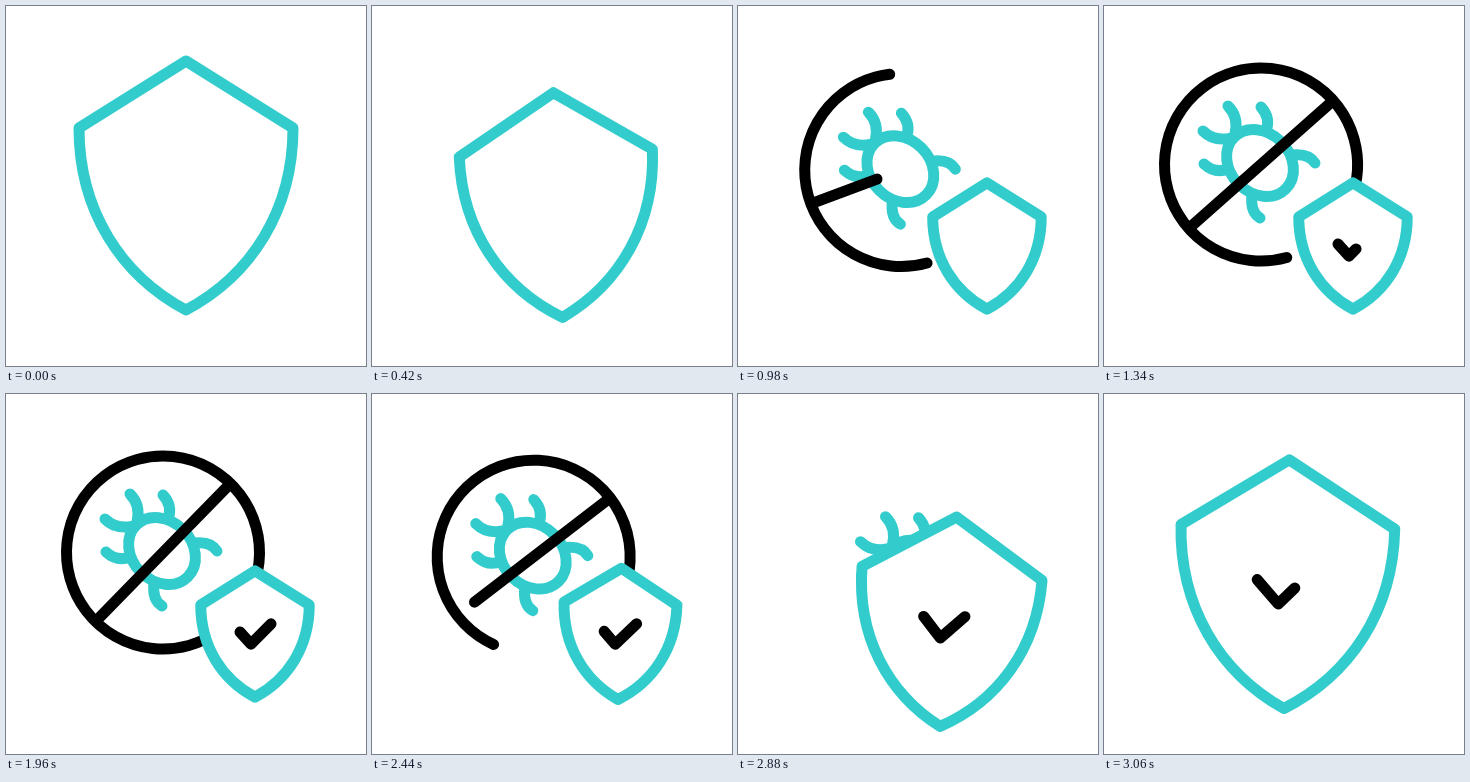
An HTML page with a canvas for the animation above (3080 ms loop, 360 by 360 pixels).

```html
<!DOCTYPE html>
<html lang="en">
<head>
<meta charset="utf-8">
<title>Virus protection</title>
<style>
  html, body { margin: 0; width: 100%; height: 100%; overflow: hidden; background: #fff; }
  canvas { display: block; width: 360px; height: 360px; }
</style>
</head>
<body>
<canvas id="stage"></canvas>
<script>
const LOOP = 3080;
const TEAL = '#33cccc';
const RAD = Math.PI / 180;

const canvas = document.getElementById('stage');
const ctx = canvas.getContext('2d');
const dpr = window.devicePixelRatio || 1;
canvas.width = canvas.height = 360 * dpr;

const mix = (a, b, k) => a + (b - a) * k;
const span = (t, from, to) => Math.min(1, Math.max(0, (t - from) / (to - from)));
const smooth = (t, from, to) => {
  const k = span(t, from, to);
  return k * k * (3 - 2 * k);
};

// Cubic easing with control points (x1, 0) and (x2, 1).
function ease(k, x1, x2) {
  let lo = 0, hi = 1;
  for (let i = 0; i < 30; i++) {
    const u = (lo + hi) / 2, v = 1 - u;
    if (3 * v * v * u * x1 + 3 * v * u * u * x2 + u * u * u < k) lo = u;
    else hi = u;
  }
  return lo * lo * (3 - 2 * lo);
}

// Strokes a path built in local space with a line weight that ignores scale.
function draw(color, place, build, fill) {
  ctx.save();
  ctx.beginPath();
  place();
  build();
  ctx.restore();
  if (fill) {
    ctx.fillStyle = fill;
    ctx.fill();
  }
  ctx.strokeStyle = color;
  ctx.stroke();
}

function shieldPose(t) {
  let along, small, turn;
  if (t < 1500) {
    along = small = ease(span(t, 0, 1000), 0.78, 0.33);
    turn = -4 * Math.sin(Math.PI * along);
  } else {
    const k = span(t, 2180, 3088);
    along = 1 - Math.pow(k, 3.6);
    small = 1 - ease(k, 0.92, 0.65);
    turn = 6.4 * smooth(t, 2300, 2740) - 5.2 * smooth(t, 2740, LOOP);
  }
  const bend = 2 * along * (1 - along), end = along * along;
  return {
    x: 180 + 69 * (0.15 * bend + end),
    y: 179.5 + 60.5 * (0.9 * bend + end),
    scale: 1 - 0.493 * small,
    turn: turn * RAD
  };
}

const shieldShape = () => {
  ctx.moveTo(0, -124.5);
  ctx.lineTo(107, -57.5);
  ctx.bezierCurveTo(107, 25, 65, 90, 0, 124.5);
  ctx.bezierCurveTo(-65, 90, -107, 25, -107, -57.5);
  ctx.closePath();
};

const bodyShape = () => ctx.ellipse(0, 0, 36.5, 30, Math.PI / 4, 0, Math.PI * 2);

const legShape = () => {
  ctx.moveTo(-32, -57);
  ctx.quadraticCurveTo(-21, -46, -25, -29);
  ctx.moveTo(1, -56);
  ctx.quadraticCurveTo(11, -45, 6, -32);
  ctx.moveTo(55, 0);
  ctx.quadraticCurveTo(49, -10, 32, -8);
};

function drawBug(shift) {
  const place = () => ctx.translate(156 + 23.5 * shift, 157 + 22.7 * shift);
  draw(TEAL, place, bodyShape);
  draw(TEAL, place, legShape);
  draw(TEAL, () => { place(); ctx.transform(0, 1, 1, 0, 0, 0); }, legShape);
}

function drawSign(t, shift) {
  const place = () => ctx.translate(157 + 23 * shift, 158.5 + 20.5 * shift);
  const cut = smooth(t, 2275, 3075);

  // On the way out the tail of the ring also draws back behind the shield.
  const ringEnd = smooth(t, 465, 1465) - 0.22 * cut;
  if (ringEnd > cut) {
    const angle = k => (74.5 + 360 * k) * RAD;
    draw('#000', place, () => ctx.arc(0, 0, 96.5, angle(cut), angle(ringEnd)));
  }

  const barEnd = smooth(t, 760, 1300);
  if (barEnd > cut) {
    const lean = t < 1700 ? 1 - smooth(t, 600, 1525) : shift;
    draw('#000', () => { place(); ctx.rotate((-45.7 + 40 * lean) * RAD); }, () => {
      ctx.moveTo(mix(-96, 96, cut), 0);
      ctx.lineTo(mix(-96, 96, barEnd), 0);
    });
  }
}

function drawShield(t) {
  const pose = shieldPose(t);
  const place = () => {
    ctx.translate(pose.x, pose.y);
    ctx.rotate(pose.turn);
    ctx.scale(pose.scale, pose.scale);
  };
  draw(TEAL, place, shieldShape, '#fff');

  const shown = smooth(t, 1060, 1560) - smooth(t, 2484, 3880);
  if (shown <= 0) return;
  const knee = 0.37;
  const first = Math.min(1, shown / knee);
  const second = span(shown, knee, 1);
  draw('#000', place, () => {
    ctx.moveTo(-29.6, -4);
    ctx.lineTo(mix(-29.6, -8, first), mix(-4, 20, first));
    if (second > 0) ctx.lineTo(mix(-8, 31.6, second), mix(20, -20, second));
  });
}

function frame(now) {
  const t = now % LOOP;
  const shift = 1 - smooth(t, 560, 1200) + smooth(t, 2276, 2845);
  ctx.setTransform(dpr, 0, 0, dpr, 0, 0);
  ctx.fillStyle = '#fff';
  ctx.fillRect(0, 0, 360, 360);
  ctx.lineWidth = 11;
  ctx.lineCap = ctx.lineJoin = 'round';
  drawBug(shift);
  drawSign(t, shift);
  drawShield(t);
  requestAnimationFrame(frame);
}
requestAnimationFrame(frame);
</script>
</body>
</html>
```
